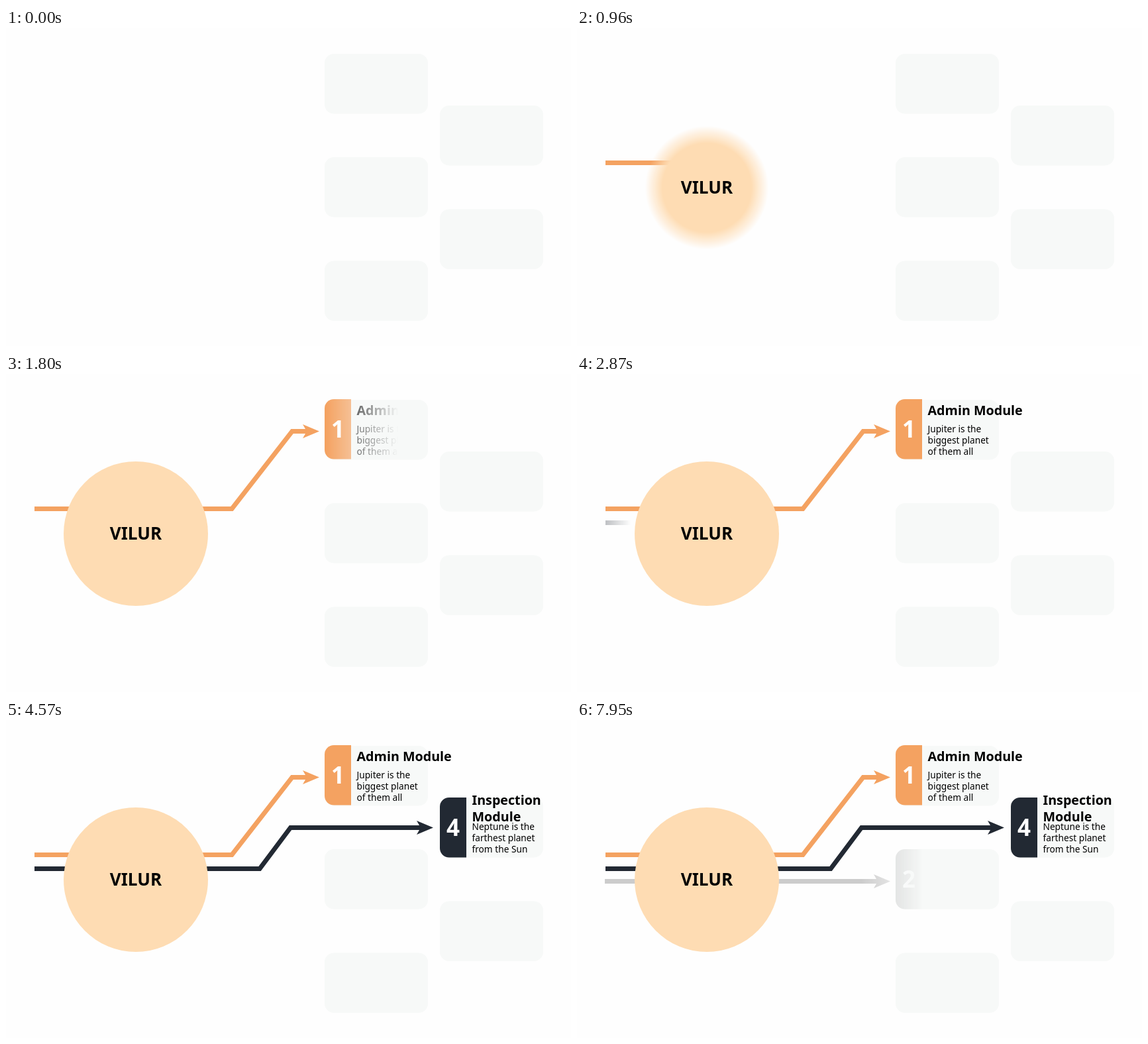
Animation, 853 px wide and 480 px high, one loop 8000 ms. Source, as an HTML page:

```html
<!DOCTYPE html>
<html lang="en">
<head>
<meta charset="utf-8">
<title>Modules</title>
<style>
  html, body { margin: 0; width: 100%; height: 100%; overflow: hidden; background: #fefefe; }
  svg { position: absolute; left: 0; top: 0; width: 853px; height: 480px; }
  text { font-family: "Noto Sans", "Open Sans", sans-serif; }
  .name { font-size: 26px; font-weight: 600; text-anchor: middle; }
  .digit { font-size: 35px; font-weight: 700; text-anchor: middle; fill: #fff; }
  .title { font-size: 19.7px; font-weight: 600; }
  .body { font-size: 13.7px; }
</style>
</head>
<body>
<script>
const LOOP = 8000, WIPE = 1750, SOFT = 0.17;

// Each branch is one group: line, arrow, numbered tile and text, wiped from the left.
const branches = [
  { start: 517, width: 641, color: '#f4a261', line: '43,203.5 341,203.5 432,86.5 456,86.5',
    tip: [473, 86.5], tile: [481, 38], digit: 1,
    title: ['Admin Module'], titleY: 62,
    body: ['Jupiter is the', 'biggest planet', 'of them all'], bodyY: 88 },
  { start: 2795, width: 769, color: '#222933', line: '43,224.5 383,224.5 429.5,162.5 628,162.5',
    tip: [645, 162.5], tile: [655, 117], digit: 4,
    title: ['Inspection', 'Module'], titleY: 128,
    body: ['Neptune is the', 'farthest planet', 'from the Sun'], bodyY: 166 },
  { start: 6650, width: 553, color: '#ccc', line: '42,243.5 456,243.5',
    tip: [473, 243.5], tile: [481, 195], digit: 2 }
];

const cards = [[481, 39], [655, 117], [481, 195], [655, 273.5], [481, 351.5]];

function addLayer(markup) {
  document.body.insertAdjacentHTML('beforeend', `<svg viewBox="0 0 853 480">${markup}</svg>`);
  return document.body.lastElementChild;
}

const textLines = (lines = [], cls, x, y, step) =>
  lines.map((s, i) => `<text class="${cls}" x="${x}" y="${y + i * step}">${s}</text>`).join('');

function branchMarkup(b) {
  const [tx, ty] = b.tip, [x, y] = b.tile;
  return `<polyline points="${b.line}" fill="none" stroke="${b.color}" stroke-width="7"/>
    <path d="M${tx} ${ty}l-25 -10.5 6 10.5 -6 10.5z" fill="${b.color}"/>
    <path d="M${x + 40} ${y}h-26a14 14 0 0 0 -14 14v62.5a14 14 0 0 0 14 14h26z" fill="${b.color}"/>
    <text class="digit" x="${x + 20}" y="${y + 57.5}">${b.digit}</text>
    ${textLines(b.title, 'title', x + 48.5, b.titleY, 25)}
    ${textLines(b.body, 'body', x + 48.5, b.bodyY, 17)}`;
}

addLayer(cards.map(([x, y]) =>
  `<rect x="${x}" y="${y}" width="156" height="90.5" rx="14" fill="#f7f9f8"/>`).join(''));
for (const b of branches) b.layer = addLayer(branchMarkup(b));
const hub = {
  start: 55, width: 154,
  layer: addLayer(`<circle cx="196" cy="241" r="109" fill="#fedcb3"/>
    <text class="name" x="196" y="250">VILUR</text>`)
};

// Soft-edged wipe: the ramp travels over the width until its tail has left it.
function wipe({ layer, start, width }, t, gradient, origin) {
  const p = Math.min(1, Math.max(0, (t - start) / WIPE));
  const lead = origin + p * (1 + SOFT) * width;
  const stops = `#000 ${lead - SOFT * width}px, transparent ${lead}px`;
  layer.style.webkitMaskImage = p < 1 ? `${gradient}, ${stops})` : 'none';
}

function draw(now) {
  const t = now % LOOP;
  for (const b of branches) wipe(b, t, 'linear-gradient(to right', 42);
  wipe(hub, t, 'radial-gradient(circle at 196px 241px', 0);
}

const begin = performance.now();
function tick() {
  draw(performance.now() - begin);
  requestAnimationFrame(tick);
}
tick();
</script>
</body>
</html>
```
